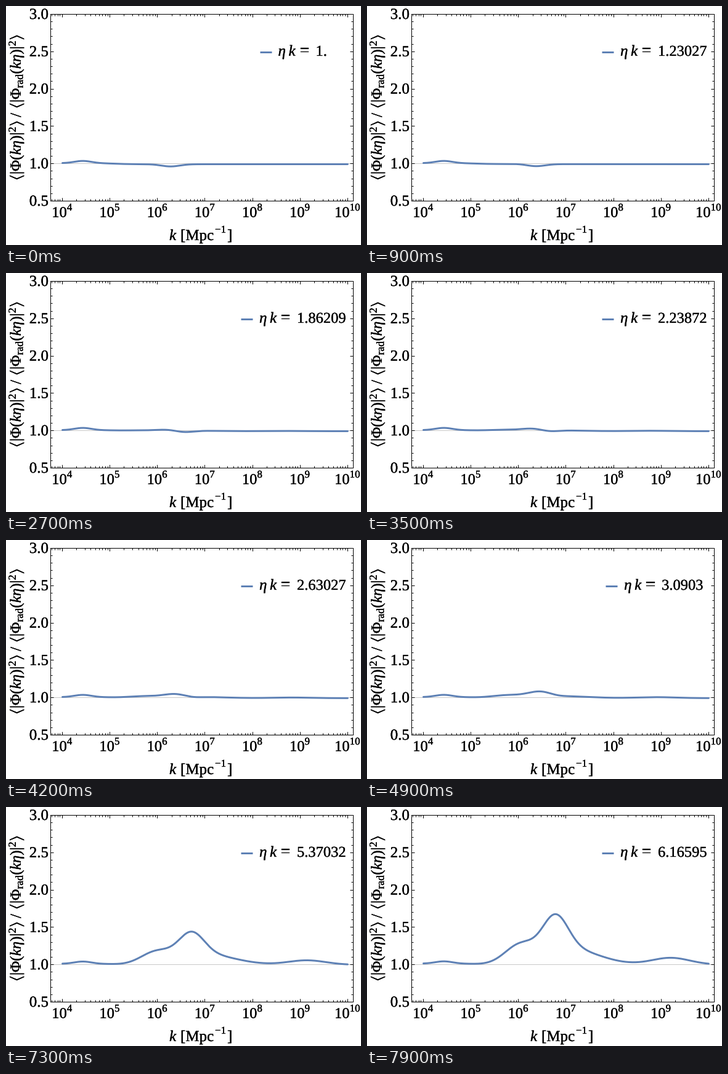
A matplotlib script that plays this animation: 576x389 px, repeating every 8000 ms.

```python
import numpy as np
import matplotlib.pyplot as plt
from matplotlib import patheffects
from matplotlib.animation import FuncAnimation

plt.rcParams.update({
    "font.family": "Liberation Serif",
    "mathtext.fontset": "custom",
    "mathtext.rm": "Liberation Serif",
    "mathtext.it": "Liberation Serif:italic",
    "mathtext.fallback": "stix",
})

W, H, DPI = 576, 389, 100
PT = 72 / DPI
FRAMES, INTERVAL = 80, 100
BLUE = "#5e81b5"
LEFT, RIGHT, TOP, BOTTOM = 72.5, 563.5, 13.5, 317.5
X4, DECADE = 91.5, 77.15
UNIT = (BOTTOM - TOP) / 2.5
S_END = (FRAMES - 1) / 100

fig = plt.figure(figsize=(W / DPI, H / DPI), dpi=DPI, facecolor="white")
ax = fig.add_axes([0, 0, 1, 1])
ax.set(xlim=(0, W), ylim=(H, 0))
ax.axis("off")


def px(log_k):
    return X4 + DECADE * (log_k - 4)


def py(value):
    return BOTTOM - UNIT * (value - 0.5)


def seg(x, y, color="black", width=1.0):
    # Pixel snapping rounds half pixels up, so shift by half a pixel first
    return ax.plot(np.array(x) - 0.5, np.array(y) - 0.5, color=color,
                   lw=width * PT, solid_capstyle="butt")[0]


def label(x, y, s, size=25, **kw):
    stroke = patheffects.withStroke(linewidth=0.3 * PT, foreground="black")
    return ax.text(x, y, s, fontsize=size * PT, va="baseline",
                   path_effects=[stroke], **kw)


def bump(u, center, width, height):
    return height * np.exp(-((u - center) / width) ** 2 / 2)


# Curve: a fixed background plus a growing wave that drifts to larger k
U = np.linspace(0, 6, 600)


def gain(s):
    def g(v):
        d = v - S_END
        return np.exp(6.9 * d + 2.6 * d * d)
    return (g(s) - g(0)) / (1 - g(0))


def ratio(s):
    base = -0.0065 + 0.014 / (1 + np.exp((U - 1.1) / 0.15))
    base += bump(U, 0.43, 0.18, 0.03)
    v = U - s + S_END
    wave = (0.008 + bump(v, 2.03, 0.32, 0.242) + bump(v, 2.77, 0.268, 0.487)
            + bump(v, 3.1, 0.6, 0.2) + bump(v, 5.2, 0.4, 0.091))
    dip = bump(U - s, 2.275, 0.195, 0.03 * (1 - 1.6 * s * s))
    return 1 + base + gain(s) * wave - dip


# Reference line, frame and ticks
seg([LEFT, RIGHT], [py(1)] * 2, "#c8c8c8")
seg([LEFT, RIGHT, RIGHT, LEFT, LEFT], [TOP, TOP, BOTTOM, BOTTOM, TOP])

for n in range(5, 31):
    y, size = py(n / 10), 5 if n % 5 == 0 else 3
    seg([LEFT, LEFT + size], [y, y])
    seg([RIGHT, RIGHT - size], [y, y])
    if n % 5 == 0:
        label(69, y + 7.5, f"{n / 10:.1f}", ha="right")

for dec in range(3, 11):
    for m in range(1, 10):
        x, size = px(dec + np.log10(m)), 5 if m == 1 else 3
        if LEFT < x < RIGHT:
            seg([x, x], [BOTTOM, BOTTOM - size])
            seg([x, x], [TOP, TOP + size])
    if dec > 3:
        x = px(dec) - 13 - 4.2 * len(str(dec))
        label(x, 343.5, "10", 24.5)
        label(x + 24.5, 333, str(dec), 17)

# Axis titles
label(265, 381, "k", style="italic")
label(283, 381, "[Mpc")
label(339, 369, "\u22121", 17)
label(359, 381, "]")
for y, s in ((284, r"$\langle|\Phi(k\eta)|^2\rangle$"), (181, "/"),
             (167, r"$\langle|\Phi_{\mathrm{rad}}(k\eta)|^2\rangle$")):
    label(24, y, s, rotation=90, rotation_mode="anchor", ha="left")

# Moving parts
curve, = ax.plot(px(4 + U), py(ratio(0)), color=BLUE, lw=3 * PT,
                 solid_capstyle="round")
key = seg([0, 0], [75.5, 75.5], BLUE, 3)
legend = [(dx, label(0, 81, s, size, style=style)) for dx, s, size, style in (
    (-1, "\u03b7", 25, "italic"), (16, "k", 25, "italic"),
    (34, "=", 28, "normal"), (60, "", 24.5, "normal"))]


def update(i):
    s = i / 100
    text = f"{10 ** s:.6g}"
    if "." not in text:
        text += "."
    x0 = 412 + 6.1 * (7 - len(text))
    curve.set_ydata(py(ratio(s)))
    key.set_xdata([x0 - 31, x0 - 12])
    for dx, t in legend:
        t.set_x(x0 + dx)
    legend[-1][1].set_text(text)
    return [curve, key] + [t for _, t in legend]


anim = FuncAnimation(fig, update, frames=FRAMES, interval=INTERVAL,
                     repeat=True, repeat_delay=0, blit=False)
plt.show()
```
